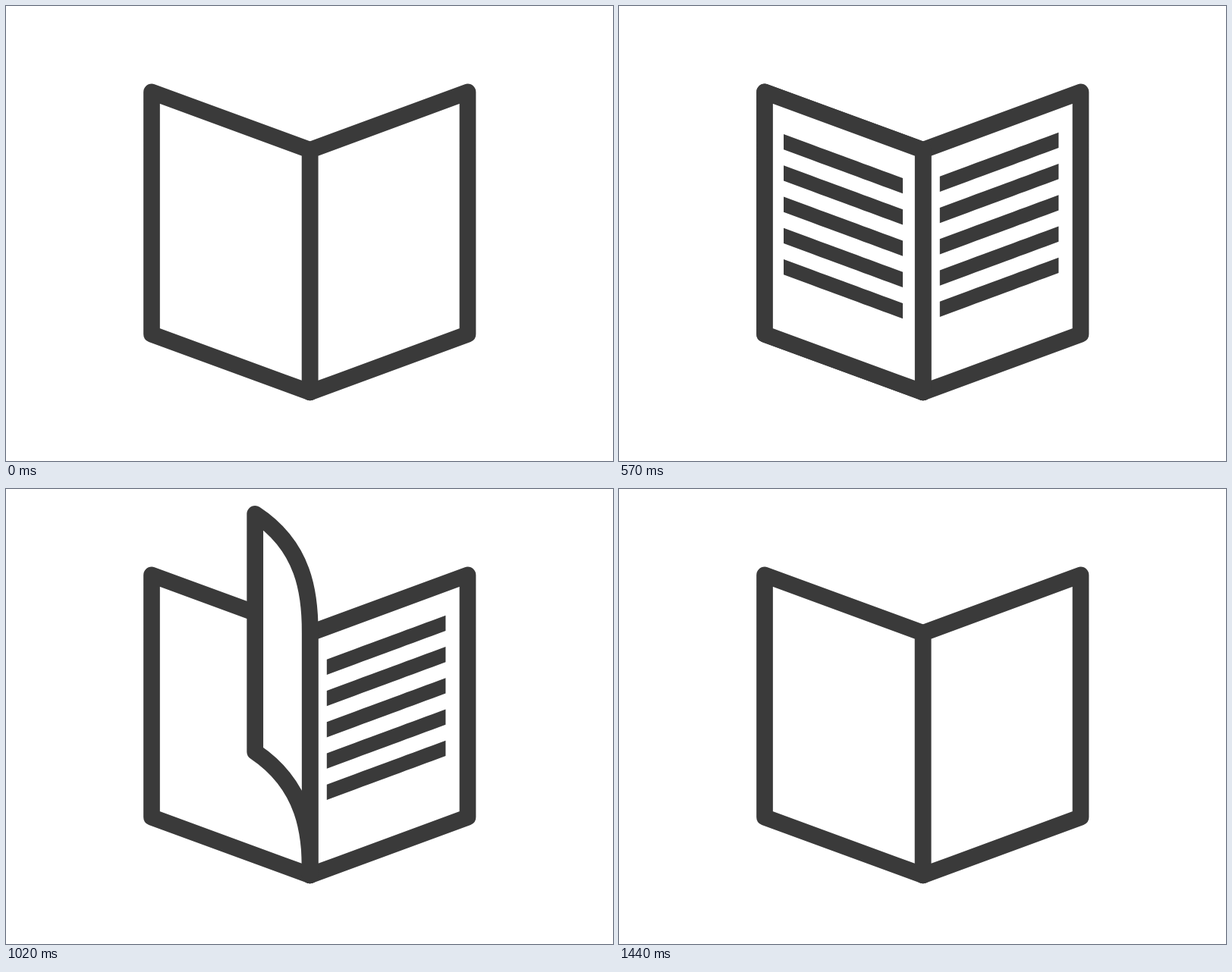
These frames come from a looping animation (800x600 px, 1.77 s). An HTML page with a canvas:

```html
<!DOCTYPE html>
<html lang="en">
<head>
<meta charset="utf-8">
<title>Book</title>
<style>
  html, body { margin: 0; height: 100%; overflow: hidden; background: #fff; }
  canvas { display: block; width: 100vw; height: 100vh; }
</style>
</head>
<body>
<canvas id="stage" width="800" height="600"></canvas>
<script>
const ctx = document.getElementById('stage').getContext('2d');
const INK = '#3a3a3a', LOOP = 1770, STEP = 30;
const WRITE_END = 570, MIDDLE = 1080, END = 1440;
const LEFT = 192, RIGHT = 608.5, SPINE = 400.7;
const OUTER_Y = 113.4, SPINE_Y = 190, HEIGHT = 319.3, UPRIGHT_Y = -10;
const ROWS = 5, ROW_GAP = 41.25, ROW_H = 20.3;
const ROW_DELAY = 65.7, ROW_TIME = 118, SOFT = 9;

const clamp = v => Math.max(0, Math.min(1, v));
const mix = (a, b, k) => a + (b - a) * k;

// Bend angles at the free end and at the spine: the spine side curls first
const bendAt = (p, amount) => ({
  tip: amount * Math.sin(Math.PI * p ** 1.25),
  root: amount * Math.sin(Math.PI * p ** 0.75)
});

// Curve handles: the chord, turned by the bend at either end
function handles(x, y, ex, ey, bend) {
  const length = Math.hypot(ex - x, ey - y), angle = Math.atan2(ey - y, ex - x);
  const a = angle - bend.tip, b = angle + bend.root;
  return [
    x + 0.45 * length * Math.cos(a), y + 0.45 * length * Math.sin(a),
    ex - 0.3 * length * Math.cos(b), ey - 0.3 * length * Math.sin(b)
  ];
}

// Closed band between two bent edges, from the free end to (ex, ey)
function band(x, y, ex, ey, tipHeight, rootHeight, bend) {
  const low = y + tipHeight, end = ey + rootHeight;
  const [ax, ay, bx, by] = handles(x, low, ex, end, bend);
  ctx.beginPath();
  ctx.moveTo(x, y);
  ctx.bezierCurveTo(...handles(x, y, ex, ey, bend), ex, ey);
  ctx.lineTo(ex, end);
  ctx.bezierCurveTo(bx, by, ax, ay, x, low);
  ctx.closePath();
}

function drawPage(x, y, bend) {
  band(x, y, SPINE, SPINE_Y, HEIGHT - 10 * bend.tip, HEIGHT, bend);
  ctx.fillStyle = '#fff';
  ctx.strokeStyle = INK;
  ctx.lineWidth = 21.7;
  ctx.lineJoin = 'round';
  ctx.fill();
  ctx.stroke();
}

function writeRows(t, x, y, width, rise, start) {
  for (let i = 0; i < ROWS; i++) {
    const k = clamp((t - start - i * ROW_DELAY) / ROW_TIME);
    if (!k) continue;
    const edge = x + k * (width + SOFT + 1), top = y + i * ROW_GAP;
    const ink = ctx.createLinearGradient(edge - SOFT, 0, edge, 0);
    ink.addColorStop(0, INK);
    ink.addColorStop(1, 'rgba(58,58,58,0)');
    ctx.fillStyle = ink;
    band(x, top, x + width, top + rise, ROW_H, ROW_H, FLAT);
    ctx.fill();
  }
}

function drawBentRows(p, alpha) {
  const k = p ** 0.75, bend = bendAt(p, 0.87);
  const x = mix(217, 374, k), y = mix(169, 150, k);
  ctx.globalAlpha = alpha;
  ctx.fillStyle = INK;
  for (let i = 0; i < ROWS; i++) {
    const drop = i * ROW_GAP;
    band(x, y + drop, 374, 227 + drop, ROW_H, ROW_H, bend);
    ctx.fill();
  }
  ctx.globalAlpha = 1;
}

const FLAT = bendAt(0, 0);

function draw(t) {
  ctx.fillStyle = '#fff';
  ctx.fillRect(0, 0, 800, 600);
  drawPage(LEFT, OUTER_Y, FLAT);
  drawPage(RIGHT, OUTER_Y, FLAT);
  if (t >= END) return;

  writeRows(t, 422.8, 224.7, 156.6, -58, 153.4);
  if (t < WRITE_END) {
    writeRows(t, 217, 169, 157, 58, 0);
  } else if (t < MIDDLE) {
    const k = (t - WRITE_END) / (MIDDLE - WRITE_END);
    const p = k * k * mix(0.27, 1, k * k);
    drawPage(mix(LEFT, SPINE, p), mix(OUTER_Y, UPRIGHT_Y, p), bendAt(p, 0.58));
    drawBentRows(p, 1 - clamp((t - 630) / 380));
  } else {
    const p = 1 - (1 - (t - MIDDLE) / (END - MIDDLE)) ** 1.13;
    drawPage(mix(SPINE, RIGHT, p), mix(UPRIGHT_Y, OUTER_Y, p), bendAt(p, 0.21));
  }
}

const origin = performance.now();
function tick() {
  const t = (performance.now() - origin) % LOOP;
  draw(Math.floor(t / STEP) * STEP);
  requestAnimationFrame(tick);
}
tick();
</script>
</body>
</html>
```
